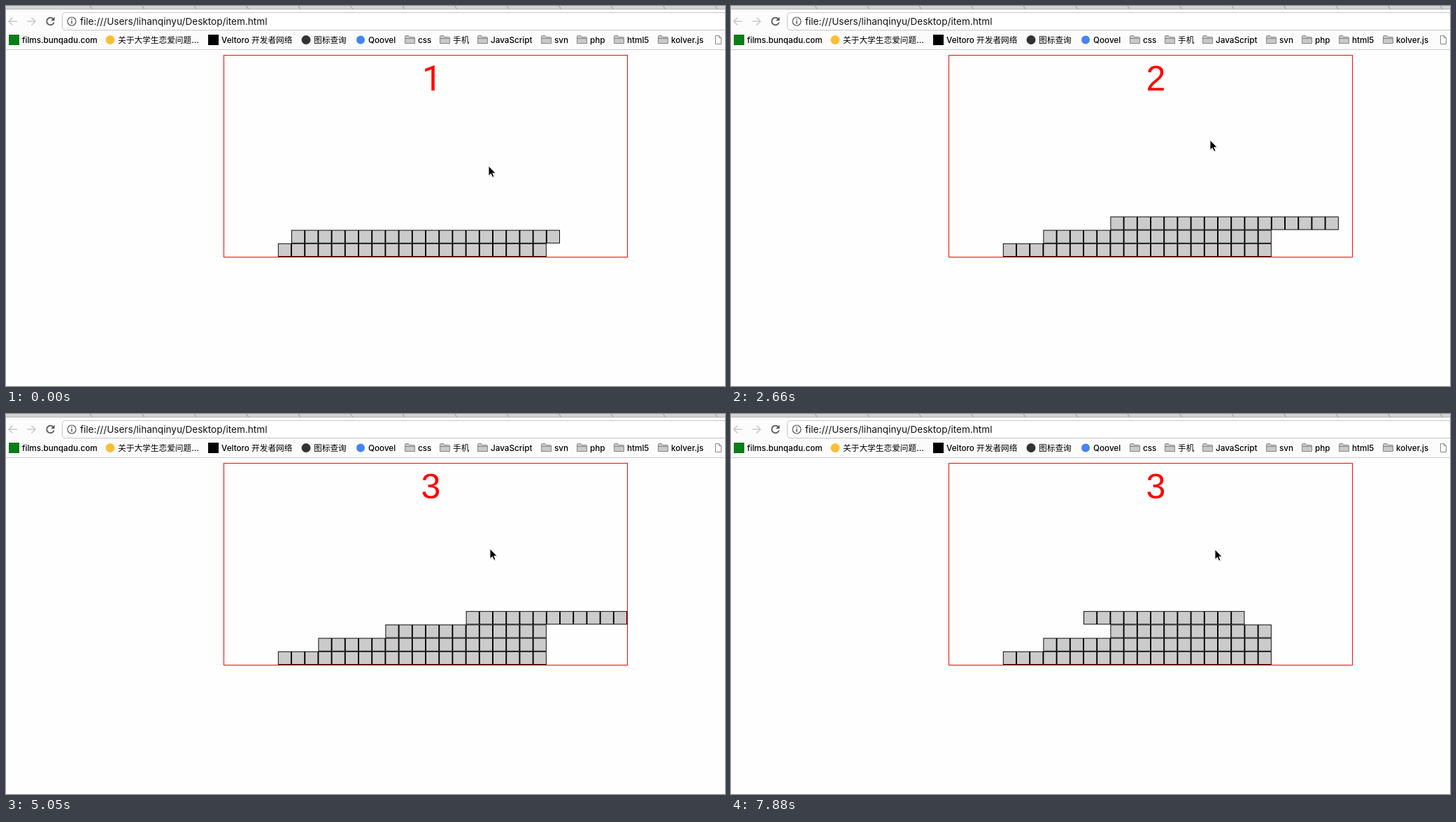
An HTML page with a canvas for the animation above (8 s loop, 1028 by 544 pixels).

```html
<!DOCTYPE html>
<html lang="zh">
<head>
<meta charset="utf-8">
<title>Stack</title>
<style>
  html, body { margin: 0; width: 100%; height: 100%; overflow: hidden; background: #fefefe; }
  canvas, svg { position: absolute; left: 0; top: 0; display: block; }
  .marks text { font: 500 11.7px Inter, "Noto Sans CJK SC", "Noto Sans CJK", sans-serif; fill: #000; }
  .url { font: 400 13.6px Inter, sans-serif; fill: #111; }
  #score { font: 50px "Liberation Sans", sans-serif; fill: #f00; text-anchor: middle; }
  #score.one { font-family: Roboto, sans-serif; }
</style>
</head>
<body>
<canvas id="game" width="1028" height="544"></canvas>
<svg width="1028" height="544" viewBox="0 0 1028 544">
  <defs>
    <g id="folder" stroke="#858585" fill="#c9c9c9">
      <path d="M.5 11.5V1.5Q.5 .5 1.5 .5H5.5L7 2.5H13.5Q14.5 2.5 14.5 3.5V11.5Z"/>
      <path d="M.5 4.5H14.5" fill="none"/>
    </g>
  </defs>

  <rect width="1028" height="62" fill="#fcfcfc"/>
  <rect width="1028" height="4" fill="#d3d3d3"/>
  <rect y="4" width="1028" height="1" fill="#b2b2b2"/>
  <path id="tabs" stroke="#8f8f8f" fill="none"/>
  <rect y="62" width="1028" height="1" fill="#cacaca"/>

  <g fill="none" stroke-width="1.6">
    <path d="M16 22H4M9.5 16.5L4 22L9.5 27.5M30 22H42M36.5 16.5L42 22L36.5 27.5" stroke="#c9c9c9"/>
    <path d="M67.6 18.5A5.3 5.3 0 1 0 68.6 23.5" stroke="#5a5a5a" stroke-width="1.8"/>
    <path d="M69.5 15.5V21H64Z" fill="#5a5a5a"/>
  </g>
  <rect x="80.5" y="9.5" width="960" height="25" rx="4" fill="#fff" stroke="#c6c6c6"/>
  <circle cx="94" cy="22" r="6" fill="none" stroke="#555" stroke-width="1.2"/>
  <path d="M94 21V25.5M94 18.2V19.8" stroke="#555" stroke-width="1.5"/>
  <text class="url" x="106" y="27">file:///Users/lihanqinyu/Desktop/item.html</text>

  <rect x="4" y="41" width="15" height="15" fill="#0b7d18"/>
  <circle cx="149" cy="48.5" r="6.5" fill="#f9bf35"/>
  <rect x="289" y="41" width="15" height="15" fill="#000"/>
  <circle cx="429" cy="48.5" r="6.5" fill="#333"/>
  <circle cx="507" cy="48.5" r="6" fill="#4285f4"/>
  <g class="marks" id="marks"></g>
  <path d="M1014.5 42.5H1019.5L1022.5 45.5V54.5H1014.5ZM1019.5 42.5V45.5H1022.5" fill="#fff" stroke="#888"/>

  <rect x="311.5" y="70.5" width="577" height="289" stroke="#f00" fill="none"/>
  <text id="score" x="607.4" y="121">1</text>

  <g id="cursor">
    <path d="M0 0V14.2L3.3 11.2L5.6 16.2L7.9 15.2L5.7 10.3H10Z" fill="#999" opacity=".35" transform="translate(.8 1.2)"/>
    <path d="M0 0V14.2L3.3 11.2L5.6 16.2L7.9 15.2L5.7 10.3H10Z" fill="#000" stroke="#fff" stroke-width=".9"/>
  </g>
</svg>

<script>
const LOOP = 8000, CELL = 19.2, LINE = .96, LEFT = 312, FLOOR = 359, TICK = 148;
const $ = id => document.getElementById(id);
const ctx = $('game').getContext('2d');

// Static bookmarks and tab edges
const marks = [
  [23, 'films.bunqadu.com'], [160, '关于大学生恋爱问题…'], [308, 'Veltoro 开发者网络'],
  [440, '图标查询'], [518, 'Qoovel'], [589, 'css', 1], [639, '手机', 1], [693, 'JavaScript', 1],
  [784, 'svn', 1], [835, 'php', 1], [888, 'html5', 1], [951, 'kolver.js', 1]
];
$('marks').innerHTML = marks.map(([x, label, folder]) =>
  (folder ? `<use href="#folder" x="${x - 19}" y="42"/>` : '') +
  `<text x="${x}" y="53">${label}</text>`).join('');
let edges = '';
for (let x = 120; x < 1028; x += 74.5) edges += `M${x} 0L${x + 3} 4`;
$('tabs').setAttribute('d', edges);

// The sliding row moves one column per step and turns back at the wall
const right = [150, 450, 1170, 1460, 1910, 2360, 2660, 3400, 3700, 4000, 4450, 4750, 5050];
const left = [5500, 5800, 6100, 6560, 6840, 7130, 7580, 7880];
const drops = [
  { at: 600, col: 7, keep: 17, cut: 3 },
  { at: 2950, col: 12, keep: 12, cut: 5 }
];
const path = [[0, 690, 229], [300, 690, 229], [1170, 685, 193], [1460, 685, 192],
  [2950, 685, 192], [3400, 692, 193], [6559, 692, 193], [6560, 692, 194]];

const passed = (times, t) => times.filter(s => s <= t).length;

// A black strip with grey cells set into it
function strip(x, y, count) {
  const inner = CELL - 2 * LINE;
  ctx.fillStyle = '#000';
  ctx.fillRect(x, y, count * CELL, CELL);
  ctx.fillStyle = '#cbcbcb';
  for (let i = 0; i < count; i++) ctx.fillRect(x + i * CELL + LINE, y + LINE, inner, inner);
}

function drawRow(row, col, count) {
  strip(LEFT + col * CELL, FLOOR - (row + 1) * CELL, count);
}

function drawDebris(drop, row, t) {
  const p = Math.floor((t - drop.at) / TICK) * TICK / 1000;
  if (p < 0 || p >= 1) return;
  ctx.save();
  ctx.beginPath();
  ctx.rect(LEFT, 71, 576, FLOOR - 71);
  ctx.clip();
  for (let i = 0; i < drop.cut; i++) {
    ctx.save();
    ctx.translate(LEFT + (drop.col + drop.keep + i + .5) * CELL, FLOOR - (row + .5) * CELL + 56 * p);
    ctx.rotate(p * Math.PI / 2);
    ctx.globalAlpha = 1 - .6 * p;
    ctx.fillStyle = '#cbcbcb';
    ctx.fillRect(LINE - CELL / 2, LINE - CELL / 2, CELL - 2 * LINE, CELL - 2 * LINE);
    ctx.lineWidth = LINE;
    ctx.strokeRect((LINE - CELL) / 2, (LINE - CELL) / 2, CELL - LINE, CELL - LINE);
    ctx.restore();
  }
  ctx.restore();
}

function moveCursor(t) {
  const i = path.findLastIndex(k => k[0] <= t);
  const a = path[i], b = path[i + 1] || a;
  const held = a[0] + Math.floor((t - a[0]) / TICK) * TICK;
  const p = b === a ? 0 : (held - a[0]) / (b[0] - a[0]);
  const x = Math.round(a[1] + (b[1] - a[1]) * p);
  const y = Math.round(a[2] + (b[2] - a[2]) * p);
  $('cursor').setAttribute('transform', `translate(${x} ${y})`);
}

function draw() {
  const t = performance.now() % LOOP;
  const done = drops.filter(d => d.at <= t);
  const level = done.length;
  ctx.clearRect(0, 0, 1028, 544);
  ctx.strokeStyle = '#000';
  drawRow(0, 4, 20);
  done.forEach((d, i) => {
    drawRow(i + 1, d.col, d.keep);
    drawDebris(d, i + 1, t);
  });
  drawRow(level + 1, 5 + passed(right, t) - passed(left, t), level ? done[level - 1].keep : 20);

  const score = $('score');
  score.textContent = level + 1;
  score.setAttribute('class', level ? '' : 'one');
  score.setAttribute('x', level ? 607.4 : 609);
  moveCursor(t);
  requestAnimationFrame(draw);
}
draw();
</script>
</body>
</html>
```
